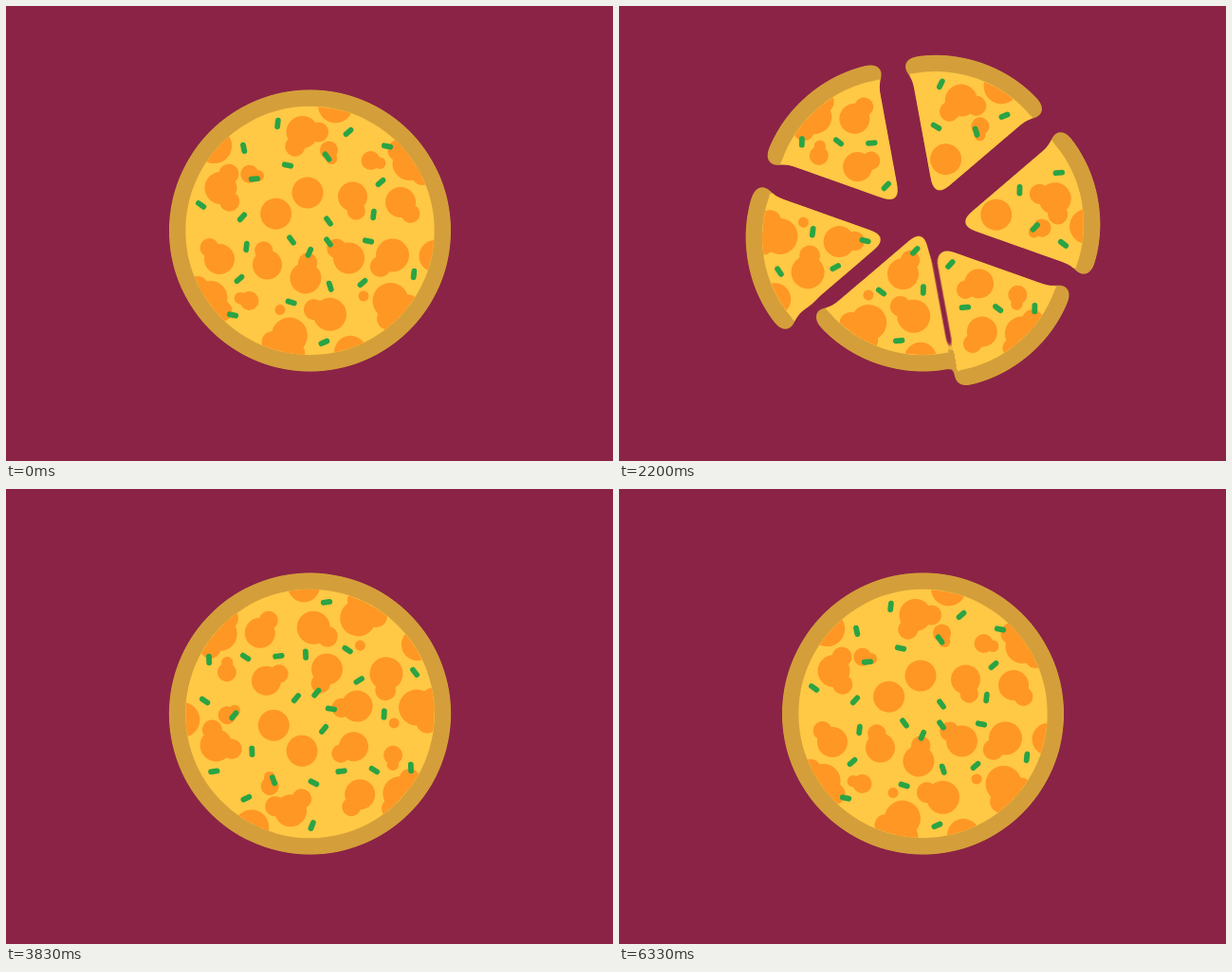
Animation of 640x480 px, one loop 7010 ms. Source, as an HTML page:

```html
<!DOCTYPE html>
<html lang="en">
<head>
<meta charset="utf-8">
<title>Pizza</title>
<style>
  html, body { margin: 0; width: 100%; height: 100%; overflow: hidden; background: #8b2346; }
  svg { display: block; width: 100vw; height: 100vh; }
  .cheese { fill: #ffc845; }
  .crust { fill: none; stroke: #d49f3a; stroke-width: 16; stroke-linecap: round; }
  .sauce { fill: #ff9724; }
  .herb { stroke: #2aa444; stroke-width: 5.8; stroke-linecap: round; }
</style>
</head>
<body>
<svg viewBox="0 0 640 480">
  <defs>
    <!-- Melts neighbouring slices together and rounds their corners -->
    <filter id="goo" filterUnits="userSpaceOnUse" x="0" y="0" width="640" height="480" color-interpolation-filters="sRGB">
      <feGaussianBlur in="SourceGraphic" stdDeviation="7"/>
      <feColorMatrix values="1 0 0 0 0  0 1 0 0 0  0 0 1 0 0  0 0 0 20 -7.8" result="melt"/>
      <feMorphology in="SourceGraphic" operator="dilate" radius="3" result="wide"/>
      <feComposite in="wide" in2="melt" operator="atop" result="base"/>
      <feComposite in="SourceGraphic" in2="base" operator="atop"/>
    </filter>
    <clipPath id="inner"><circle r="131"/></clipPath>
  </defs>
  <g filter="url(#goo)"><g id="dough"></g></g>
  <g id="toppings"></g>
</svg>
<script>
const LOOP = 7010, SPREAD = 39;

// Key points from the pizza's centre. Blobs: [x, y, radius, ...lobe directions]
const right = {
  blobs: [[45, -36, 15.5, 76], [95.5, -30, 16, 49], [64, -74, 10, 16], [105, -71, 18, 41, 229]],
  herbs: [[81.5, -89], [19.5, -10], [67, -17], [74.5, -51]]
};
const lower = {
  blobs: [[41, 29, 16.5, 218], [87, 26, 17.5, 137], [56.5, 69, 5.5], [85, 74, 19, 98, 16], [132, 27, 17]],
  herbs: [[61.5, 11], [19.5, 12], [109.5, 46], [55.5, 55]]
};
const upper = {
  blobs: [[-2.5, -40, 16.5], [-8, -104, 17, 117, 0], [20, -85, 9.5, 72], [27, -132, 18.5]],
  herbs: [[-23.5, -69], [18, -78], [-34, -113], [40.5, -104]]
};

// Slices in the order they leave, clockwise from the bottom: [layout, turn]
const slices = [[lower, 60], [right, 180], [upper, -60], [upper, 0], [right, 0], [lower, 0]];

const polar = (r, deg) => {
  const a = deg * Math.PI / 180;
  return [r * Math.cos(a), r * Math.sin(a)];
};
const arc = r => `${polar(r, -30)} A${r} ${r} 0 0 1 ${polar(r, 30)}`;
const middle = i => 90 + 60 * i;

const circle = (x, y, r) => `<circle class="sauce" cx="${x}" cy="${y}" r="${r}"/>`;
const blob = ([x, y, r, ...lobes]) => circle(x, y, r) + lobes.map(dir => {
  const [dx, dy] = polar(r, dir);
  return circle(x + dx, y + dy, 0.62 * r);
}).join('');
const herb = ([x, y], i) =>
  `<path class="herb" d="M-3.3 0H3.3" transform="translate(${x} ${y}) rotate(${12 + 42 * i})"/>`;

const dough = document.getElementById('dough');
const toppings = document.getElementById('toppings');

slices.forEach(([{ blobs, herbs }, turn], i) => {
  dough.innerHTML += `<g><g transform="rotate(${middle(i)})">
    <path class="cheese" d="M0 0 L${arc(133)}Z"/><path class="crust" d="M${arc(139.2)}"/></g></g>`;
  toppings.innerHTML += `<g><g clip-path="url(#inner)"><g transform="rotate(${turn})">
    ${blobs.map(blob).join('')}${herbs.map(herb).join('')}</g></g></g>`;
});

const progress = (t, start, end) => Math.min(1, Math.max(0, (t - start) / (end - start)));
const smooth = u => u * u * (3 - 2 * u);

// Same curve as cubic-bezier(x1, 0, x2, 1)
function ease(x, x1, x2) {
  let s = 0;
  for (let step = 0.5; step > 1e-5; step /= 2) {
    const n = s + step, m = 1 - n;
    if (3 * m * m * n * x1 + 3 * m * n * n * x2 + n ** 3 <= x) s = n;
  }
  return smooth(s);
}

function draw(now) {
  const t = now % LOOP;
  const closed = smooth(progress(t, 3080, 3850));
  const angle = 360 * ease(progress(t, 100, 5607), 0.5215, 0.638);
  for (const layer of [dough, toppings]) {
    layer.setAttribute('transform', `translate(320.5 237) rotate(${angle})`);
    slices.forEach((_, i) => {
      const start = 545 + 345 * i;
      const out = SPREAD * smooth(progress(t, start, start + 480)) * (1 - closed);
      layer.children[i].setAttribute('transform', `translate(${polar(out, middle(i))})`);
    });
  }
}

function tick() {
  draw(performance.now());
  requestAnimationFrame(tick);
}
tick();
</script>
</body>
</html>
```
